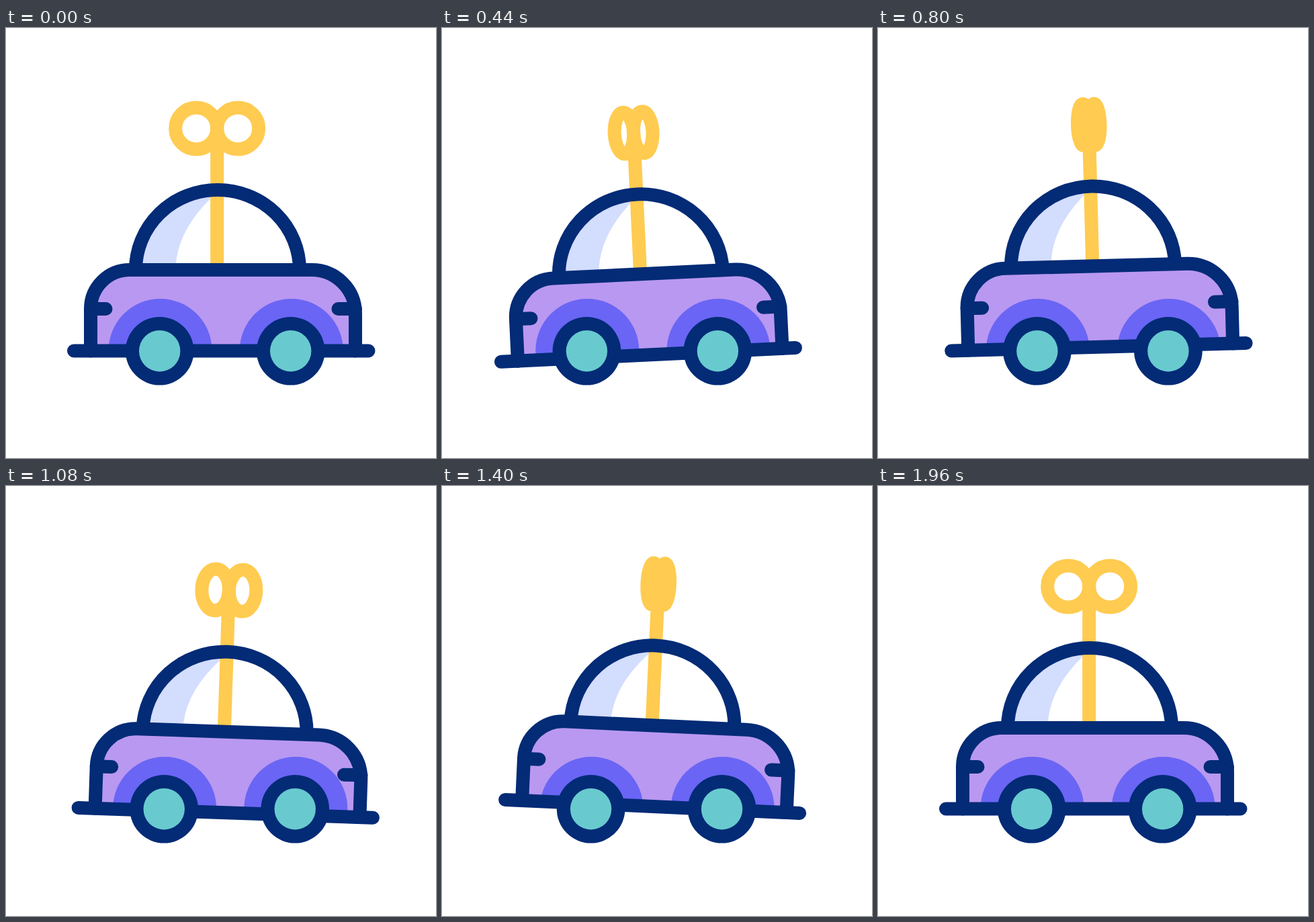
These frames come from a looping animation (640 by 640 pixels, 2000 ms). An HTML page:

```html
<!DOCTYPE html>
<html lang="en">
<head>
<meta charset="utf-8">
<title>Wind-up car</title>
<style>
  html, body { margin: 0; width: 100%; height: 100%; overflow: hidden; background: #fff; }
  svg { display: block; width: 100vw; height: 100vh; }
  .line { fill: none; stroke: #032b76; stroke-width: 20; stroke-linecap: round; }
  .key { fill: none; stroke: #ffcb50; stroke-width: 20; }
  .arch { fill: #6a65f5; }
  .tyre { fill: #032b76; }
  .hub { fill: #68cacf; }
</style>
</head>
<body>
<svg viewBox="0 0 640 640">
  <defs>
    <path id="shell" d="M126 480.5V418A58 58 0 0 1 184 360H455A65 65 0 0 1 520 425V480.5"/>
    <clipPath id="inside"><use id="mask" href="#shell"/></clipPath>
    <g id="wheel">
      <circle class="tyre" r="50.8"/>
      <circle class="hub" r="30.7"/>
    </g>
  </defs>

  <g class="body">
    <path fill="#d3ddfe" d="M193 360A122 119 0 0 1 314 241V245Q258 295 253 350V360Z"/>
    <g class="key">
      <path d="M314.2 150V360"/>
      <ellipse class="ring" cy="149.4" ry="31"/>
      <ellipse class="ring" cy="149.4" ry="31"/>
    </g>
    <path class="line" d="M193 360A122 119 0 0 1 437 360"/>
    <use href="#shell" fill="#b998f1"/>
  </g>

  <g clip-path="url(#inside)">
    <g class="roll arch">
      <circle cx="229.6" cy="480" r="77"/>
      <circle cx="424.8" cy="480" r="77"/>
    </g>
  </g>

  <g class="body">
    <use href="#shell" class="line"/>
    <path class="line" d="M101 480.5H539.5M126 418H148.5M494.5 418H520"/>
  </g>

  <g class="roll">
    <use href="#wheel" x="228.7" y="480.7"/>
    <use href="#wheel" x="423.7" y="480.7"/>
  </g>
</svg>
<script>
  const LOOP = 2000, STEP = 40;
  const FLIP = 300, FLIPS = 6, RING = 31, THIN = 0.45;

  const all = sel => [...document.querySelectorAll(sel)];
  const bodies = all('.body, #mask');
  const rollers = all('.roll');
  const rings = all('.ring');

  const smooth = p => p * p * (3 - 2 * p);
  const mix = (a, b, p) => a + (b - a) * p;

  // Eases from rest through [time, value] stops and holds the last one.
  function glide(t, stops) {
    let from = [0, 0];
    for (const to of stops) {
      if (t < to[0]) return mix(from[1], to[1], smooth((t - from[0]) / (to[0] - from[0])));
      from = to;
    }
    return from[1];
  }

  // Rocks to +size, -size, ... at the given times, then rests at the last one.
  function swing(t, size, ...times) {
    const rest = times.length - 1;
    return glide(t, times.map((time, i) => [time, i === rest ? 0 : size * (-1) ** i]));
  }

  // Half-width of each key ring while the key spins.
  function ringWidth(t) {
    const turn = Math.min(t / FLIP, FLIPS) % 2;
    return mix(THIN, RING, smooth(Math.abs(1 - turn)));
  }

  function draw(t) {
    const x = glide(t, [[440, -13.3], [940, 13.3], [1310, -7.8], [1800, 0]]);
    const y = swing(t, 5.9, 440, 780, 1100, 1520, 1900);
    const angle = swing(t, -3.1, 560, 1280, 1760);

    const pose = `translate(${x} ${y}) rotate(${angle} 320 480.5)`;
    bodies.forEach(el => el.setAttribute('transform', pose));
    rollers.forEach(el => el.setAttribute('transform', `translate(${x} 0)`));

    const rx = ringWidth(t);
    rings.forEach((el, i) => {
      el.setAttribute('rx', rx);
      el.setAttribute('cx', 314.2 + (i ? rx : -rx));
    });
  }

  const start = performance.now();
  function tick() {
    const t = (performance.now() - start) % LOOP;
    draw(Math.floor(t / STEP) * STEP);
    requestAnimationFrame(tick);
  }
  tick();
</script>
</body>
</html>
```
